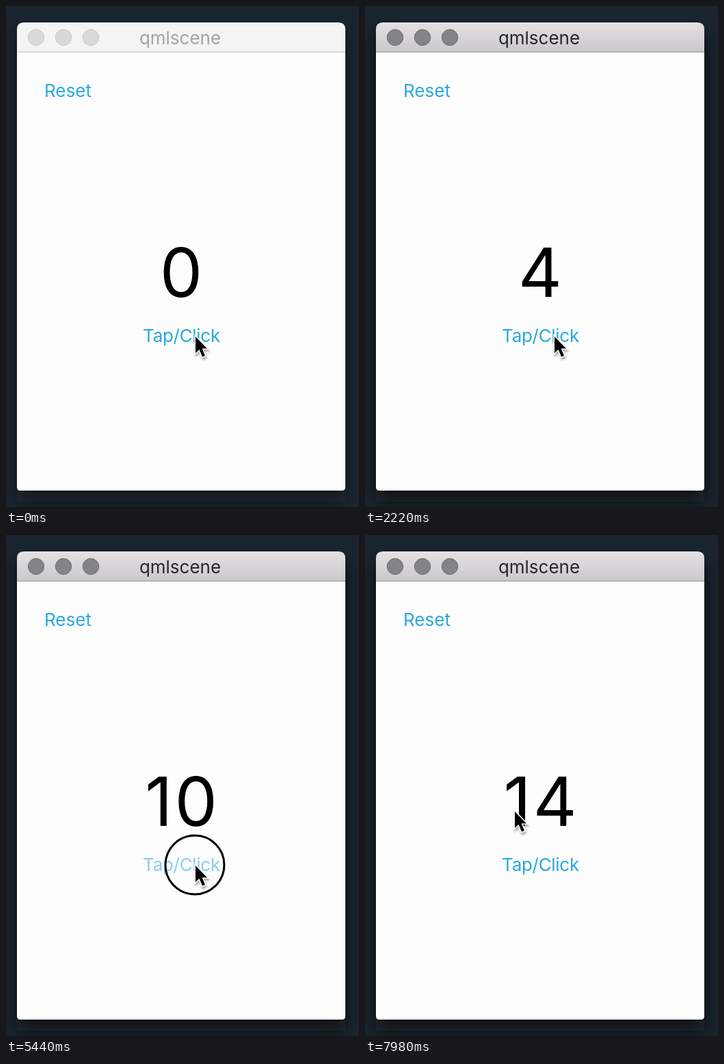
Animation of 516 by 732 pixels, one loop 8000 ms. Source, as an HTML page:

```html
<!DOCTYPE html>
<html lang="en">
<head>
<meta charset="utf-8">
<title>Tap counter</title>
<style>
  html, body { margin: 0; width: 100%; height: 100%; overflow: hidden; background: #1a232c; }
  svg { display: block; width: 100vw; height: 100vh; }
  text { font-family: Inter, Roboto, sans-serif; font-size: 26px; }
  .mid { text-anchor: middle; }
  .link { fill: #2ba9dc; }
  #count { font-size: 99px; letter-spacing: 3px; }
  #tap { letter-spacing: -.3px; }
</style>
</head>
<body>
<svg viewBox="0 0 516 732">
  <defs>
    <linearGradient id="active" x2="0" y2="1">
      <stop offset="0" stop-color="#e3e1e3"/>
      <stop offset="1" stop-color="#cac8cb"/>
    </linearGradient>
    <filter id="blur" x="-20%" y="-20%" width="140%" height="140%">
      <feGaussianBlur stdDeviation="12"/>
    </filter>
    <filter id="soft" x="-50%" y="-50%" width="200%" height="200%">
      <feGaussianBlur stdDeviation="1.5"/>
    </filter>
    <path id="arrow" d="M0 0V24L5.5 19L10 29.5L14 28L9.7 17.5H17Z"/>
  </defs>

  <rect width="516" height="732" fill="#1b252f"/>
  <rect id="shadow" x="16" y="40" width="480" height="684" fill="#080b0c" filter="url(#blur)"/>
  <path d="M16 60H496V703Q496 708 491 708H21Q16 708 16 703Z" fill="#fdfdfd"/>
  <path id="bar" d="M16 68V34Q16 24 26 24H486Q496 24 496 34V68Z"/>
  <path id="line" d="M16 67.3H496" stroke-width="1.5"/>
  <g id="lights" stroke-width="1">
    <circle cx="44" cy="46" r="11.7"/>
    <circle cx="84" cy="46" r="11.7"/>
    <circle cx="124" cy="46" r="11.7"/>
  </g>
  <text id="title" class="mid" x="254.5" y="56">qmlscene</text>

  <text class="link" x="56" y="133">Reset</text>
  <text id="count" class="mid" x="257.5" y="425">0</text>
  <text id="tap" class="mid link" x="256.5" y="491">Tap/Click</text>

  <circle id="ring" cx="276" cy="482" r="43" fill="none" stroke="#000" stroke-width="3"/>
  <g id="cursor">
    <use href="#arrow" x="1" y="3" fill="#555" stroke="#555" stroke-width="3" opacity=".5" filter="url(#soft)"/>
    <use href="#arrow" fill="#000" stroke="#fff" stroke-width="3" paint-order="stroke"/>
  </g>
</svg>
<script>
  // Taps and cursor run on steps, which last 20, 100 and 20 ms in turn.
  const LOOP = 8000, HOLD = 5, LEAVE = 160, LAST = 171;
  const releases = [15, 25, 36, 46, 57, 67, 79, 90, 102, 111, 121, 131, 142, 152];
  const $ = id => document.getElementById(id);
  const set = (id, attrs) => {
    for (const key in attrs) $(id).setAttribute(key, attrs[key]);
  };

  function stepAt(time) {
    const rest = time % 140;
    return Math.floor(time / 140) * 3 + (rest < 20 ? 0 : rest < 120 ? 1 : 2);
  }

  function render(time) {
    const step = stepAt(time);
    const active = step >= releases[0] - HOLD;
    const pressed = releases.some(r => step >= r - HOLD && step < r);

    set('shadow', { opacity: active ? 0.75 : 0.45 });
    set('bar', { fill: active ? 'url(#active)' : '#f4f4f4' });
    set('line', { stroke: active ? '#aaa8aa' : '#d2d2d2' });
    set('lights', { fill: active ? '#848385' : '#d9d9d9', stroke: active ? '#6c6b6d' : '#c6c6c6' });
    set('title', { fill: active ? '#272628' : '#a3a3a3' });

    $('count').textContent = releases.filter(r => step >= r).length;
    set('tap', { opacity: pressed ? 0.55 : 1 });
    set('ring', { visibility: pressed ? 'visible' : 'hidden' });

    const p = Math.max(0, (step - LEAVE) / (LAST - LEAVE)) ** 2;
    set('cursor', { transform: `translate(${277 - 58 * p} ${483 - 79 * p})` });
  }

  const start = performance.now();
  function tick() {
    render((performance.now() - start) % LOOP);
    requestAnimationFrame(tick);
  }
  tick();
</script>
</body>
</html>
```
